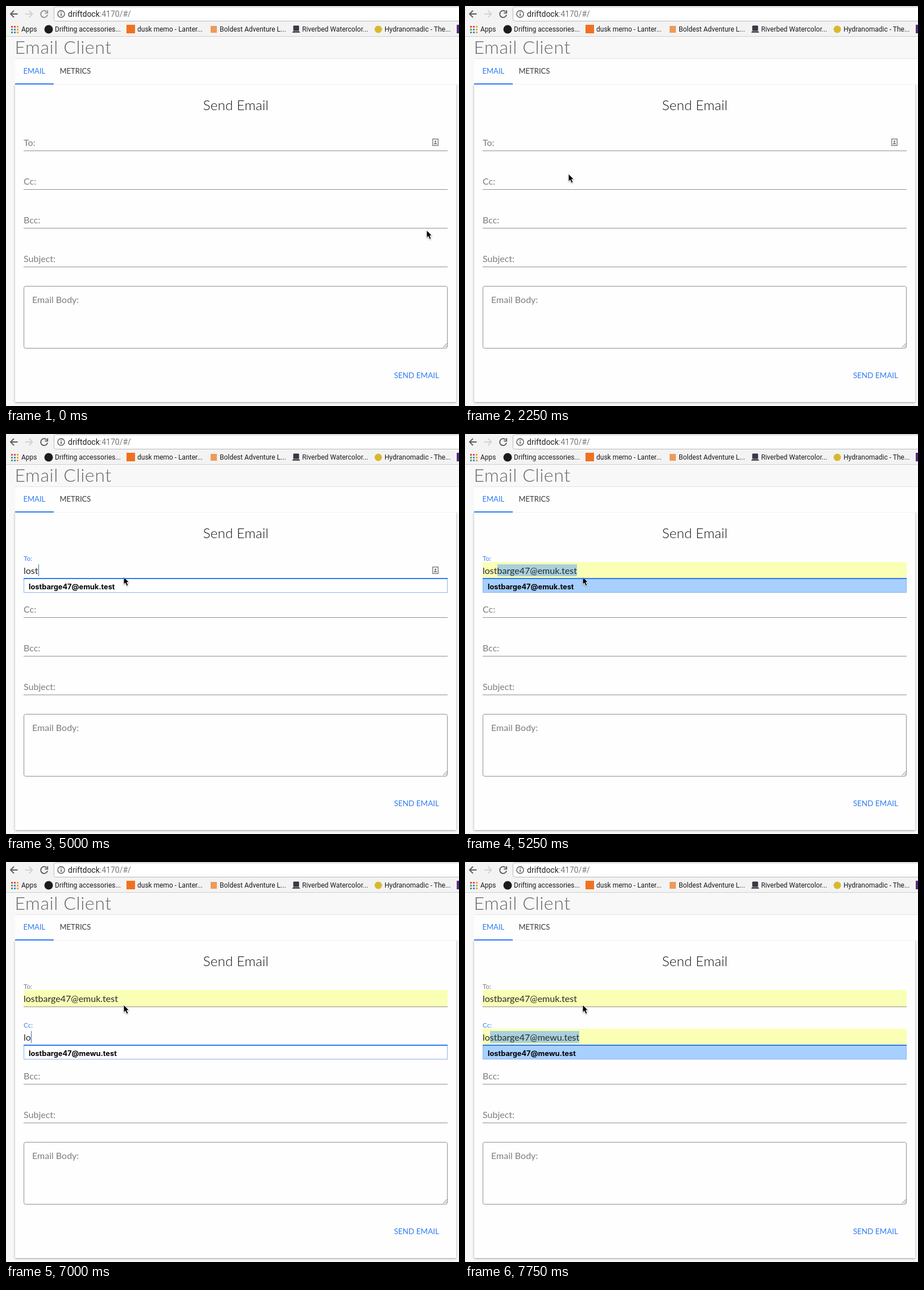
An HTML page for the animation above (8 s loop, 797x703 px).

```html
<!DOCTYPE html>
<html lang="en">
<head>
<meta charset="utf-8">
<title>Email Client</title>
<style>
  html, body { margin: 0; width: 100%; height: 100%; overflow: hidden; background: #f8f8f8; }
  body { position: relative; font: 16px Lato, sans-serif; color: #2b2b2b; }
  svg { position: absolute; left: 0; top: 0; }
  .bar { font: 12px Roboto, sans-serif; fill: #1c1c1c; }
  .card { filter: drop-shadow(0 1px 1px #0003) drop-shadow(0 1px 2px #0003); }
  .field { position: absolute; left: 31px; width: 746px; height: 30px; }
  .field > * { position: absolute; white-space: pre; }
  .fill { inset: 0 0 1px; background: #faffb5; }
  .label { left: 0; top: 5px; line-height: 20px; color: #7e7e7e; transform-origin: 0 50%; }
  .line { left: 0; right: 0; top: 29px; height: 1px; background: #8f8f8f; }
  .entry { left: 0; top: 4px; display: flex; height: 21px; line-height: 21px; }
  .picked { background: #a9d1dc; }
  .caret { width: 1px; margin-right: -1px; background: #3f6fbd; }
  .list { left: 0; right: 0; top: 30px; height: 23px; border: 1px solid #8ab4ea; border-top: 0;
          padding-left: 8px; font: 700 12.8px/27px Inter, sans-serif; color: #000; }
  .focus .label { color: #3f83f5; }
  .focus .line { top: 28px; height: 2px; background: #2f7bf3; z-index: 1; }
</style>
</head>
<body>
<svg width="797" height="703" viewBox="0 0 797 703">
  <!-- browser bars -->
  <rect width="797" height="53" fill="#f3f3f3"/>
  <path d="M0 53.5H797" stroke="#d0d0d0"/>
  <rect x="84.5" y="1.5" width="730" height="25" rx="3" fill="#fff" stroke="#b9b9b9"/>
  <g fill="none" stroke-width="1.8">
    <path d="M20.500 14H8.500M14 8L8 14L14 20" stroke="#5a5a5a"/>
    <path d="M34 14H46M40.500 8L46.500 14L40.500 20" stroke="#d2d2d2"/>
    <g id="reload"><path d="M71.500 10A6 6 0 1 0 73 15.500"/><path d="M73.200 7.500V12.300H68.400"/></g>
    <circle cx="97" cy="14" r="6" stroke="#555" stroke-width="1.400"/>
    <path d="M97 13V17.500M97 10V11.700" stroke="#555" stroke-width="1.600"/>
  </g>
  <text x="109" y="19" style="font:14px Roboto,sans-serif" fill="#222">driftdock<tspan fill="#777">:4170/#/</tspan></text>
  <g id="bookmarks" class="bar"></g>
  <circle cx="75" cy="41" r="7.500" fill="#1b1b1b"/>
  <rect x="212" y="33" width="15" height="15" fill="#f0701f"/>
  <rect x="360" y="35" width="11" height="12" fill="#ee9a58"/>
  <path d="M506 35H515V43H506Z" fill="#333c48" stroke="#222"/>
  <path d="M505 44H516L517.500 47H503.500Z" fill="#555"/>
  <circle cx="655" cy="41" r="6.500" fill="#d9b92c"/>
  <rect x="793" y="33" width="4" height="15" fill="#5b2d86"/>

  <!-- page -->
  <text x="15.500" y="83.500" font-size="32" font-weight="300" letter-spacing=".6" fill="#666">Email Client</text>
  <rect class="card" x="16" y="137" width="776" height="559" fill="#fefefe"/>
  <rect x="16" y="92" width="781" height="45" fill="#fefefe"/>
  <path d="M16 92.500H797" stroke="#e3e3e3"/>
  <path d="M84 137.500H792" stroke="#f0f0f0"/>
  <rect x="16" y="136" width="68" height="2" fill="#2f7bf3"/>
  <text x="30.500" y="119" font-size="13" fill="#2f7bf3">EMAIL</text>
  <text x="94.500" y="119" font-size="13" fill="#3a3a3a">METRICS</text>
  <text x="404.500" y="182.500" font-size="24" font-weight="300" letter-spacing=".2" text-anchor="middle" fill="#111">Send Email</text>
  <rect x="31.500" y="492.500" width="745" height="109" rx="3" fill="#fefefe" stroke="#8f8f8f"/>
  <path d="M769 600L776 593M773 600L776 597" stroke="#777"/>
  <text x="46" y="522" fill="#7e7e7e">Email Body:</text>
  <text x="762" y="654" font-size="13.500" text-anchor="end" fill="#2f7bf3">SEND EMAIL</text>
  <g fill="#858585">
    <path d="M750 233H761V246H750ZM751.500 234.500V244.500H759.500V234.500Z" fill-rule="evenodd"/>
    <circle cx="755.500" cy="238" r="1.700"/>
    <path d="M753 243V241.500Q755.500 239 758 241.500V243Z"/>
  </g>
</svg>
<div id="form"></div>
<svg width="797" height="703">
  <path id="pointer" d="M0 0V13.500L3 10.800L5.300 16L8 14.800L5.700 9.700H9.700Z" fill="#000" stroke="#fff" stroke-width="1"
        style="filter:drop-shadow(0 1px 1px #0005)"/>
</svg>
<script>
const STEP = 250, LOOP = 8000;
const $ = id => document.getElementById(id);
const clamp = v => Math.max(0, Math.min(1, v));

const bookmarks = [
  [27, "Apps"], [86, "Drifting accessories..."], [231, "dusk memo - Lanter..."],
  [376, "Boldest Adventure L..."], [521, "Riverbed Watercolor..."], [666, "Hydranomadic - The..."]
];
const dots = ["#e0483c", "#e0483c", "#f0a030", "#45a35a", "#4285d8", "#f0a030", "#45a35a", "#4285d8", "#f0a030"];
$("bookmarks").innerHTML =
  bookmarks.map(([x, name]) => `<text x="${x}" y="45">${name}</text>`).join("") +
  dots.map((color, i) =>
    `<rect x="${9 + i % 3 * 5}" y="${35 + Math.floor(i / 3) * 5}" width="3" height="3" fill="${color}"/>`).join("");

const fields = ["To:", "Cc:", "Bcc:", "Subject:"].map((name, i) => {
  const root = document.createElement("div");
  root.className = "field";
  root.style.top = 225 + 68 * i + "px";
  root.innerHTML = `<div class="fill"></div><div class="label">${name}</div>
    <div class="entry"><span class="typed"></span><span class="caret"></span><span class="picked"></span></div>
    <div class="line"></div><div class="list"></div>`;
  $("form").append(root);
  return root;
});

function showField(root, { focus = false, float = 0, typed = "", picked = "", caret = false, filled = false, list = "", active = false }) {
  const part = name => root.querySelector("." + name);
  root.classList.toggle("focus", focus);
  part("label").style.transform = `translateY(${-21.5 * float}px) scale(${1 - 0.27 * float})`;
  part("typed").textContent = typed;
  part("picked").textContent = picked;
  part("caret").style.display = caret ? "" : "none";
  part("fill").style.display = filled ? "" : "none";
  part("list").style.display = list ? "" : "none";
  part("list").textContent = list;
  part("list").style.background = active ? "#a8d0ff" : "#fff";
}

const toAddress = "lostbarge47@emuk.test";
const ccAddress = "lostbarge47@mewu.test";

// [time, x, y]; the pointer is sampled once per step
const route = [
  [0, 740, 394], [500, 736, 470], [1000, 732, 585], [1250, 735, 622], [1500, 755, 655],
  [1750, 470, 490], [2000, 165, 335], [2250, 182, 295], [2500, 198, 260], [2750, 207, 251]
];
function pointerAt(t) {
  const next = route.findIndex(p => p[0] > t);
  if (next < 0) return route[route.length - 1].slice(1);
  const [a, b] = [route[next - 1], route[next]];
  const k = (t - a[0]) / (b[0] - a[0]);
  return [1, 2].map(i => a[i] + (b[i] - a[i]) * k);
}

function toState(t) {
  const count = t < 4250 ? 0 : t < 5250 ? Math.floor((t - 4000) / STEP) : 4;
  const accepted = t >= 5500, suggested = t >= 5250;
  return {
    focus: t >= 3000 && t < 5750,
    float: clamp((t - 2875) / 250),
    typed: accepted ? toAddress : toAddress.slice(0, count),
    picked: suggested && !accepted ? toAddress.slice(4) : "",
    caret: t >= 3250 && t < 5250 && t !== 3750,
    filled: suggested,
    list: t >= 4250 && !accepted ? toAddress : "",
    active: suggested
  };
}

function ccState(t) {
  const suggested = t >= 7750;
  return {
    focus: t >= 5750,
    float: clamp((t - 5625) / 250),
    typed: ccAddress.slice(0, t < 6500 ? 0 : t < 7000 ? 1 : 2),
    picked: suggested ? ccAddress.slice(2) : "",
    caret: t >= 6500 && t < 7500,
    filled: suggested,
    list: t >= 6500 ? ccAddress : "",
    active: suggested
  };
}

let shown = -1;
function draw(now) {
  const t = Math.floor(now % LOOP / STEP) * STEP;
  if (t !== shown) {
    shown = t;
    const states = [toState(t), ccState(t), {}, {}];
    fields.forEach((root, i) => showField(root, states[i]));
    $("pointer").setAttribute("transform", `translate(${pointerAt(t)})`);
    $("reload").setAttribute("stroke", t < STEP ? "#8c8c8c" : "#555");
  }
  requestAnimationFrame(draw);
}
draw(performance.now());
</script>
</body>
</html>
```
